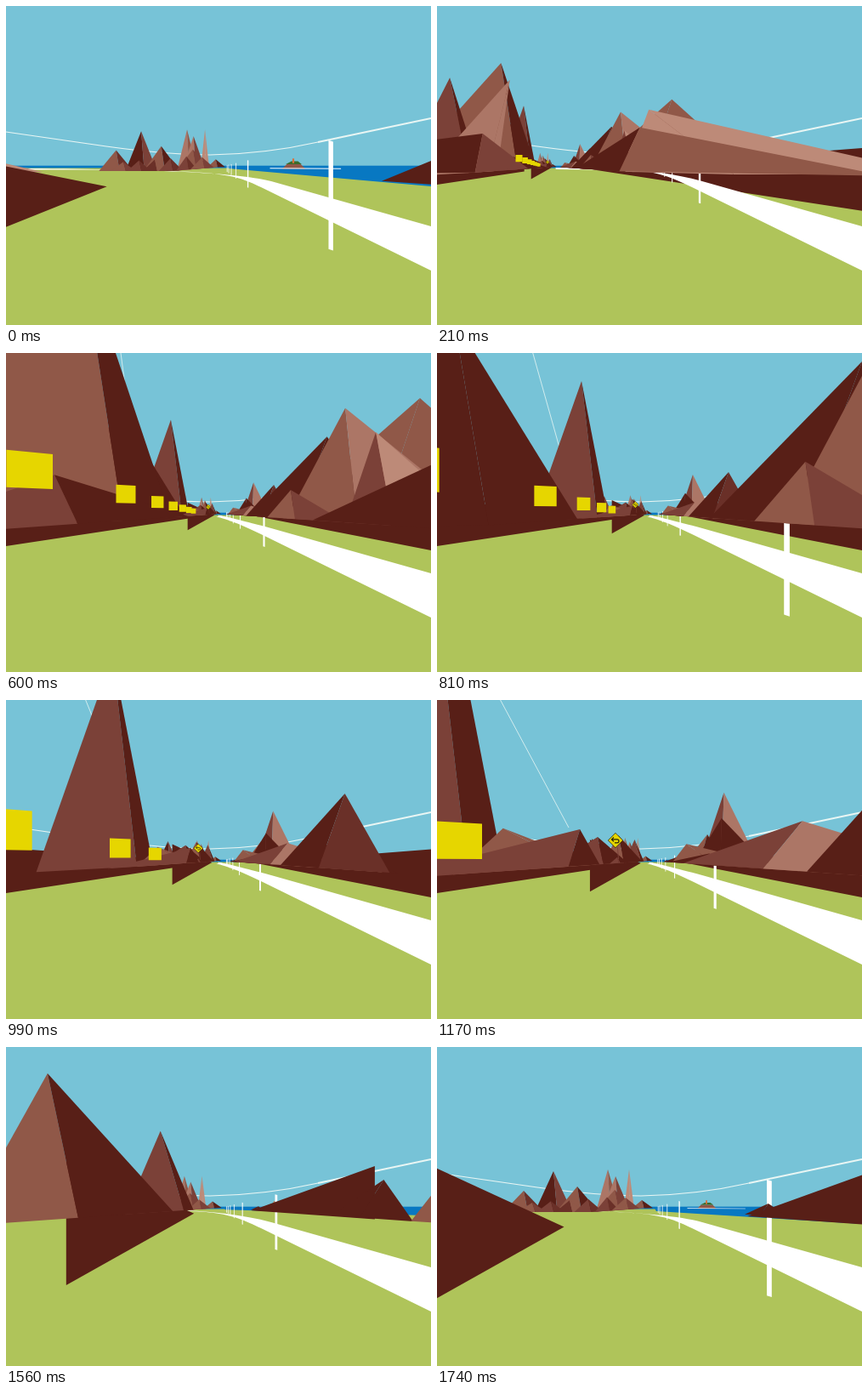
These frames come from a looping animation (500 by 375 pixels, 1800 ms). An HTML page with a canvas:

```html
<!DOCTYPE html>
<html lang="en">
<head>
<meta charset="utf-8">
<title>Coastal drive</title>
<style>
html, body { margin: 0; width: 100%; height: 100%; overflow: hidden; background: #77c3d7; }
canvas { display: block; width: 500px; height: 375px; }
</style>
</head>
<body>
<canvas id="stage" width="500" height="375"></canvas>
<script>
const ctx = document.getElementById('stage').getContext('2d');
const VX = 252, VY = 189, SPEED = .31, LAST = 58, EYE = 45, TURN = 520, BEND_STEPS = 10;
const colors = {
  d: '#581f17', r: '#6a3028', b: '#7b4138', m: '#905848', l: '#ac7666', p: '#bd8a78',
  w: '#fff', g: '#afc45a', s: '#0878c2', y: '#e6d600', t: '#3c6b2a', o: '#d8703a', k: '#28240c'
};

const clamp = u => Math.max(0, Math.min(1, u));
const mix = (a, b, u) => a + (b - a) * u;
const place = (x, y, sx = 1, sy = sx) => ctx.setTransform(sx, 0, 0, sy, x, y);

function face(key, ...p) {
  ctx.fillStyle = colors[key];
  ctx.beginPath();
  for (let i = 0; i < p.length; i += 2) ctx.lineTo(p[i], p[i + 1]);
  ctx.fill();
}
function line(path, width, color = '#e9f6f4') {
  ctx.strokeStyle = color;
  ctx.lineWidth = width;
  ctx.stroke(new Path2D(path));
}

// World: distance along the road, and sizes in pixels as seen from distance 1.
const world = [];

// A two-sided peak; the fold splits its base between the left and right tone.
function peak(along, x, height, left, right, tones, fold = x < 0 ? .86 : .35) {
  const draw = z => {
    const foot = px => [px, Math.min(EYE / z, .07 * Math.abs(px))];
    const top = [x / z, -height / z];
    const a = foot((x - left) / z), c = foot((x + right) / z);
    const b = foot(mix(a[0], c[0], fold));
    face(tones[0], ...top, ...a, ...b);
    face(tones[1], ...top, ...b, ...c);
  };
  world.push({ along, draw });
}

// A roadside bank: a tip near the road, widening outward with two slopes.
function bank(along, x, y, up, down) {
  const reach = 400 * Math.sign(x);
  const draw = z => face('d', x / z, y / z, (x + reach) / z, (y - 400 * up) / z, (x + reach) / z, (y + 400 * down) / z);
  world.push({ along, draw });
}

// Start of the bend
bank(.9, -120, 21, .2, .4);
bank(.9, 171, 15, .41, .07);

// First gorge
peak(6.22, -348, 158, 1600, 218, 'db');
peak(6.52, -235, 445, 442, -64, 'll');
peak(6.72, -567, 477, 264, 162, 'bd');
peak(7.6, -273, 64, 300, 220, 'bd', .65);
peak(8.82, -428, 811, 770, 275, 'md');
peak(6.32, 411, 192, 312, 1200, 'dm', .14);
peak(7.22, 553, 340, 140, 1700, 'pp');
peak(7.8, 430, 107, 256, 800, 'dd');
peak(9.4, 586, 307, 115, 400, 'bp');
peak(10.2, 332, 112, 110, 260, 'mb');
peak(10.55, 640, 540, 300, 730, 'ml');
peak(11.8, 1316, 762, 900, 900, 'mm');

// Second gorge
peak(10.37, -464, 458, 1200, 290, 'dd');
peak(13.64, -432, 822, 306, 163, 'bd');
peak(13.39, -109, 48, 310, 30, 'bd');
peak(13.45, -237, 52, 80, 150, 'mm');
peak(10.6, 553, 399, 400, 300, 'dd');
peak(13.27, 446, 240, 230, 160, 'dr');
peak(13.3, 346, 73, 115, 300, 'dd');
peak(13.59, 267, 70, 210, 375, 'bl', .24);

// Open stretch and the next bend
peak(15.47, -213, 95, 200, 118, 'bd', .7);
peak(15.42, -133, 14, 30, 12, 'bb');
peak(17.07, -193, 150, 95, 140, 'md', .55);
peak(17.67, -109, 140, 65, 60, 'bd');
peak(15.27, 216, 27, 150, 200, 'dd');
peak(15.47, 140, 67, 56, 450, 'mm');
peak(15.57, 288, 174, 115, 200, 'dd');
peak(16.98, 323, 152, 130, 110, 'md');
peak(17.07, 426, 400, 140, 220, 'bl');
peak(17.57, 279, 48, 90, 50, 'dd');
bank(18.78, -82, 18, .46, .56);
bank(18.88, 102, 9, .36, .07);
peak(18.88, 124, 4.5, 25, 22, 'dd');

// Far range: main summits, then seeded foothills in front
const RANGE_Z = 8.9, RANGE = RANGE_Z + SPEED * LAST;
let seed = 7;
const random = () => (seed = seed * 16807 % 2147483647) / 2147483647;
const summits = [[-150, 20, 24, 'mr'], [-115, 43, 22, 'db'], [-51, 45, 14, 'lm'], [-42, 37, 16, 'lb'], [-26, 45, 6, 'pp'],
  [-87, 25, 25, 'md'], [-43, 21, 23, 'mb'], [-11, 9, 13, 'md']];
const summit = ([x, h, w, tones]) =>
  peak(RANGE, x * RANGE_Z, h * RANGE_Z, w * RANGE_Z, w * RANGE_Z, tones, .6);
const rangeStart = world.length;
summits.forEach(summit);
for (let i = 0; i < 6; i++) summit([-140 + 22 * i, 6 + 8 * random(), 13 + 5 * random(), 'mbrmd'.substr(3 * random(), 2)]);
const range = world.slice(rangeStart);

const turnEase = n => {
  const u = clamp(n / BEND_STEPS);
  return TURN * u * u * (3 - 2 * u);
};

function road(v) {
  const mid = (v + 245) / 2;
  ctx.fillStyle = colors.w;
  ctx.fill(new Path2D(`M${v} 190C${mid} 191 245 188 312 206L500 259V311L300 213C262 194 245 192 ${mid} 192.5L${v} 192Z`));
}

function posts(n) {
  const passed = .2245 * n - .334, first = Math.ceil(passed);
  place(VX, VY);
  for (let k = first + 5; k >= first; k--) {
    const z = 1.38 * (k - passed);
    if (z < .2) continue;
    const x = 60 / z, w = Math.max(.4, 1.25 / z), skew = .4 / z;
    const top = -14 / z, bottom = EYE / z;
    face('w', x - w, top - skew, x + w, top + skew, x + w, bottom + skew, x - w, bottom - skew);
  }
}

function signs(n, shift) {
  place(VX + shift, VY);
  for (let i = 6; i >= 0; i--) {
    const z = 1 + i * .98 - SPEED * (n - 20), near = z - .07;
    if (near < .2) continue;
    const top = 4.5 * i - 70, bottom = top + 41;
    face('y', -234 / near, top / near, -197 / z, top / z, -197 / z, bottom / z, -234 / near, bottom / near);
  }
  const z = 15.04 - SPEED * n;
  if (z < .3) return;
  place(VX + shift - 124 / z, VY - 71 / z, 2.95 / z);
  face('b', 2, 8, 3, 8, 4, 22, 3, 22);
  for (const [key, r] of [['k', 9], ['y', 8.3]]) face(key, 0, -r, r, 0, 0, r, -r, 0);
  line('M-1 3H2Q4 3 4 1T2 -1H-4M-2 -3.5L-4.5 -1L-2 1.5', 1.2, colors.k);
}

function island() {
  face('m', -12, 4, -7, -1, 8, -1, 13, 4);
  face('t', -8, -1, -2, -4, 5, -4, 9, -1);
  face('o', -1, -7, 1, -7, 1, -2, -1, -2);
  face('w', -25, 3, 51, 3.5, 51, 4.3, -25, 3.8);
}

// Low dark feet of the gorge walls
function walls(n, shift) {
  const end = mix(215, 137, clamp((n - 39) / 8)) - VX, rise = mix(.16, .2, clamp((n - 12) / 7));
  place(VX + shift, VY);
  face('d', -552, -36, end, 0, end, -end * .151, -552, 83);
  face('d', 48, 2, 800, -56, 800, 800 * rise - 9, 48, 4);
}

function render(n) {
  const turned = turnEase(n), shift = turned - TURN, turning = n < BEND_STEPS;
  const bend = clamp((n - 47) / 11);
  place(0, 0);
  ctx.fillStyle = '#77c3d7';
  ctx.fillRect(0, 0, 500, 375);
  ctx.fillStyle = colors.g;
  ctx.fillRect(0, 189, 500, 186);
  ctx.fillStyle = colors.s;
  ctx.fillRect(0, 187.7, 500, 2.8);

  line('M0 148L118 165Q190 175 240 175Q305 174 367 160', 1.2);
  line('M367 160L500 132', 1.8);
  if (n >= 16 && n < 52) line(`M${135 - 3.18 * (n - 20)} 0L155 150`, .8);

  if (turning) face('s', 262 + turned, 188, 1100, 188, 1100, 270, 500 + turned, 212, 262 + turned, 191);
  else if (bend) face('s', 255, 188, 500, 188, 500, 190 + 18 * bend, 258, 190 + 3 * bend);

  if (n > 3 && n < 50) walls(n, shift);
  place(0, 0);
  road(turning ? VX + shift : mix(250, 233, clamp((n - 39) / 8)) - 333 * bend);
  posts(n);

  if (turning || n > 41) {
    const near = clamp((n - 42) / 16);
    if (turning) place(338 + turned, 187, 1.1);
    else place(mix(313, 317, near), 186.5, mix(.45, .9, near));
    island();
  }
  if (turning) {
    place(256 + turned, VY, .843, .97);
    for (const hill of range) hill.draw(RANGE_Z);
  }

  const visible = world
    .map(item => ({ ...item, z: item.along - SPEED * n }))
    .filter(item => item.z > .12)
    .sort((a, b) => b.z - a.z);
  for (const { along, draw, z } of visible) {
    place(VX + (along < 1 ? turned : shift), VY);
    draw(z);
  }
  signs(n, shift);
}

const start = performance.now();
function tick() {
  const time = (performance.now() - start) % 1800;
  render(Math.min(LAST, Math.floor(time / 30)));
  requestAnimationFrame(tick);
}
tick();
</script>
</body>
</html>
```
